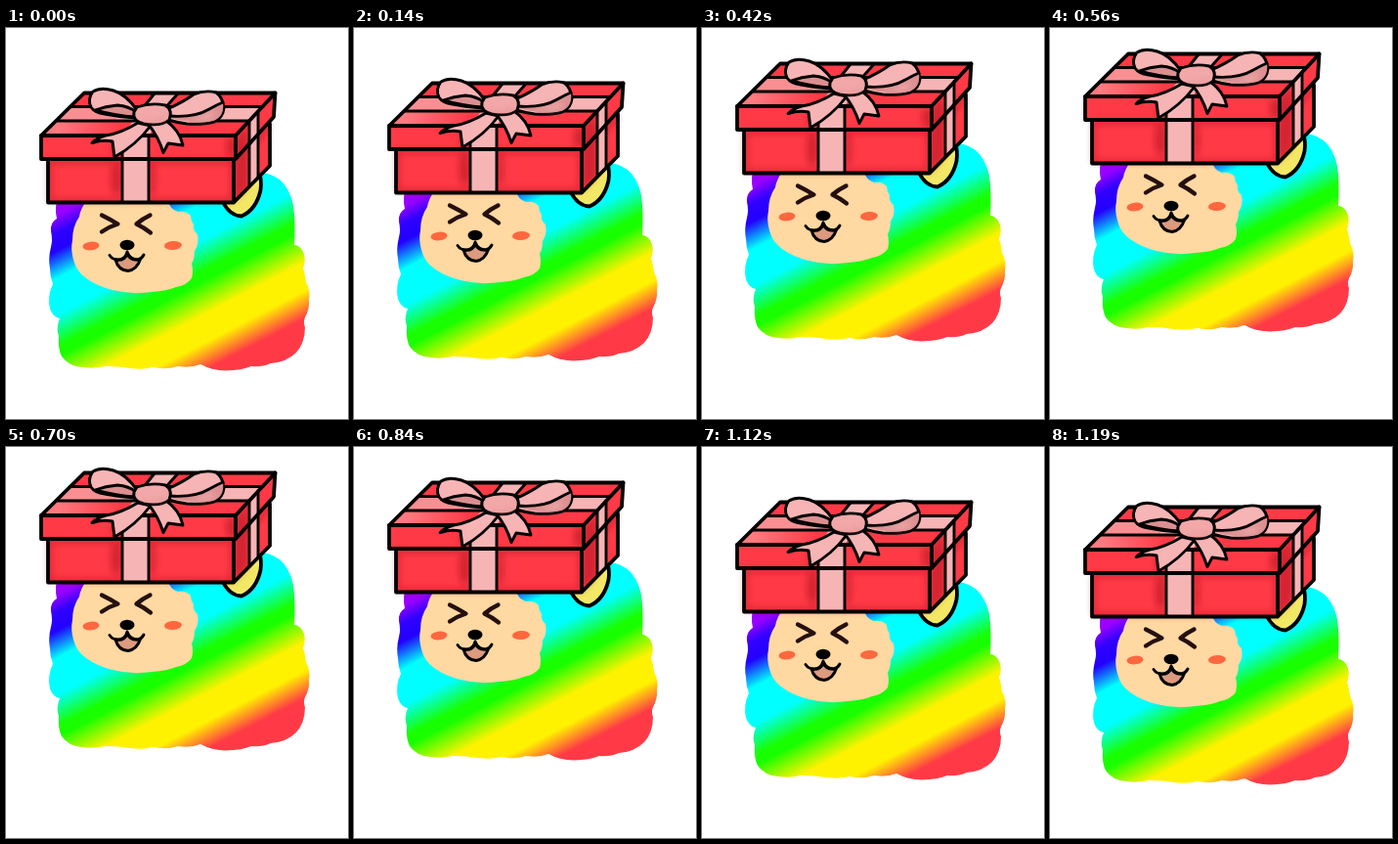
An HTML page that plays this animation: 350 px wide and 400 px high, repeating every 1260 ms.

```html
<!DOCTYPE html>
<html lang="en">
<head>
<meta charset="utf-8">
<title>Rainbow sheep with a gift</title>
<style>
  html, body { margin: 0; width: 100%; height: 100%; overflow: hidden; background: #fff; }
  svg { display: block; width: 100%; height: 100%; }
  .ink { stroke: #000; stroke-width: 3.8; stroke-linejoin: round; stroke-linecap: round; }
  .thin { stroke-width: 2.9; }
  .eye { stroke: #25100f; stroke-width: 4.3; }
  .red { fill: #ff3a46; }
  .pink { fill: #f7b4b5; }
  .none { fill: none; }
</style>
</head>
<body>
<svg viewBox="0 0 350 400">
  <defs>
    <!-- Bands run along y + 0.52x; the vector spans 200 to 460 on that scale -->
    <linearGradient id="rainbow" gradientUnits="userSpaceOnUse" x1="81.86" y1="157.43" x2="188.28" y2="362.09">
      <stop offset=".07" stop-color="#9a00ff"/>
      <stop offset=".14" stop-color="#3000ff"/>
      <stop offset=".21" stop-color="#2200ff"/>
      <stop offset=".32" stop-color="#00ffff"/>
      <stop offset=".465" stop-color="#00ffff"/>
      <stop offset=".59" stop-color="#18ff00"/>
      <stop offset=".63" stop-color="#18ff00"/>
      <stop offset=".765" stop-color="#fff200"/>
      <stop offset=".875" stop-color="#fff200"/>
      <stop offset=".985" stop-color="#ff3a46"/>
    </linearGradient>
    <linearGradient id="shine">
      <stop offset=".2" stop-color="#ff7a80"/>
      <stop offset="1" stop-color="#ff3a46"/>
    </linearGradient>
    <filter id="soft" x="-60%" y="-60%" width="220%" height="220%">
      <feGaussianBlur stdDeviation="3"/>
    </filter>
    <clipPath id="lidFront"><path d="M36 110H235V134H36Z"/></clipPath>
    <clipPath id="boxFront"><path d="M43 135H233V178H43Z"/></clipPath>
    <clipPath id="side"><path d="M235 110L275 66V91L270 97V141L233 178Z"/></clipPath>
  </defs>

  <g id="sheep">
    <path fill="url(#rainbow)" d="M54 170Q49 184 52 195Q45 199 46 208Q48 217 46 224
      Q43 236 45 246Q45 254 48 262Q42 274 45 287Q48 296 55 297Q51 307 54 315
      Q53 328 57 336Q64 346 78 347Q90 349 101 346Q116 346 126 348Q140 350 151 347
      Q164 350 176 346Q189 348 199 344Q210 350 225 350.500Q242 350 251 346
      Q262 347 271 343Q287 342 297 332Q306 322 306 306Q304 301 306 296
      Q311 287 310 278Q312 269 307 260Q306 251 304 246Q308 235 303 227
      Q299 222 295 222Q296 208 295 190Q294 171 284 159Q275 149 261 148L230 160Z"/>

    <path class="ink" fill="#f3e866" d="M222 178Q229 192 241 192.500Q256 186 260.500 166Q262 156 259 148L234 168Z"/>

    <path fill="#ffd8a2" d="M84 174Q76 185 75 193Q68 203 68 217Q66 226 69 237Q72 249 82 256
      Q93 264 109 268Q128 273 149 270Q165 269 174 265Q185 263 190 256Q192 249 190 241
      Q193 236 193 228Q198 221 196 211Q191 207 192 201Q189 197 189 192
      Q184 187 176 188Q168 186 164 174Z"/>

    <g fill="#ff673f">
      <ellipse cx="87" cy="223" rx="8.500" ry="4.300" transform="rotate(-6 87 223)"/>
      <ellipse cx="171" cy="222.500" rx="9" ry="4.400" transform="rotate(-4 171 222.500)"/>
    </g>
    <path class="ink eye none" d="M98 191.500Q107 196 114.500 200.500Q106 203 98 208.500"/>
    <path class="ink eye none" d="M147.500 191.500Q140 195 133.500 200.500Q141 204 148 209.500"/>
    <path class="ink thin" fill="#dc9a7e" d="M112 237Q115 248 125 248.500Q134 247 137.500 236.500Q128 239 124 231Q121 239 112 237Z"/>
    <path class="ink thin none" d="M106 232.500Q109 237 114 237Q122 237 124 229Q127 237 135 237Q139 236 141 232"/>
    <ellipse cx="124" cy="222" rx="7.500" ry="5.300"/>

    <!-- box -->
    <path class="red" d="M43 134H233V178H43Z"/>
    <path class="red" d="M233 134L270 97V141L233 178Z"/>
    <path class="red" d="M36 110L80 66.500H275V91L235 134H36Z"/>
    <path fill="url(#shine)" d="M36 110L51 95H118L112 110Z"/>
    <g fill="#a80f1a" opacity=".5" filter="url(#soft)">
      <g clip-path="url(#boxFront)">
        <path class="none" stroke="#a80f1a" stroke-width="7" d="M43 135H233V178H43Z"/>
        <ellipse cx="113" cy="154" rx="6" ry="17"/>
        <ellipse cx="150" cy="154" rx="3" ry="17"/>
      </g>
      <g clip-path="url(#lidFront)">
        <ellipse cx="113" cy="124" rx="5" ry="8"/>
        <ellipse cx="230" cy="122" rx="5" ry="11"/>
      </g>
      <path clip-path="url(#side)" d="M235 112L248 98V120L270 97V104L248 128V162L234 178Z"/>
    </g>

    <!-- ribbon -->
    <path class="pink" d="M110 95L124 80.500H262L249 95Z"/>
    <path fill="#f98f92" d="M52 95L66 80.500H124L110 95Z"/>
    <path class="pink" d="M119 110L152 66.500H176L146 110V178H119Z"/>
    <path class="pink" d="M249 95L258 85V152L249 162Z"/>
    <g class="ink none thin">
      <path d="M52 95H249M66 80.500H263"/>
      <path d="M119 110V178M146 110V178M152 67L140 82M176 67L160 85"/>
      <path d="M249 96V162M258 85V152"/>
    </g>
    <g class="ink none">
      <path d="M36 110L80 66.500H275.500L235 110Z"/>
      <path d="M36 110V134H235V110M235 134L274 91L275.500 66.500"/>
      <path d="M43 135V178.500H233V135M233 178.500L270 141V98"/>
    </g>

    <!-- bow -->
    <g class="ink thin pink">
      <path d="M135 97Q117 108 102 110Q94 112 88 117.500Q99 114 109 116L111 132Q133 120 148 100Z"/>
      <path d="M146 99Q156 111 161 127.500L166 118L181 120Q178 105 164 95Z"/>
      <path d="M134 84Q123 68 110 64Q97 60 89 65Q83 73 87 81Q91 87 101 88Q116 91 132 92Z"/>
      <path d="M165 83Q181 76 192 68Q204 63 215 66Q222 71 223 82Q222 92 213 96Q202 99 185 98Q176 97 166 94Z"/>
      <path fill="#dc8f90" d="M132 91Q113 90 91 84Q102 80 114 79Q126 80 133 86Z"/>
    </g>
    <path fill="#dc8f90" d="M168 91Q193 92 208 83Q218 78 222 76Q224 91 212 95Q195 99 168 92Z"/>
    <path class="pink" filter="url(#soft)" d="M182 93Q203 92 214 85Q213 93 202 94Z"/>
    <path class="ink thin none" d="M167 90Q193 92 208 83Q217 78 222 76"/>
    <path class="ink thin" fill="#f2a7a8" d="M134 81Q148 76 163 79Q171 84 167 94Q159 101 141 98Q129 95 131 86Z"/>
    <path filter="url(#soft)" fill="#cf7c7e" opacity=".6" d="M136 92Q149 100 164 91L160 97H142Z"/>
  </g>
</svg>
<script>
  const STEP = 70, STEPS = 18, RISE = 5;
  const sheep = document.getElementById("sheep");

  // Climb for half the loop, then sink back, one hard step at a time.
  function draw(ms) {
    const step = Math.floor(ms / STEP) % STEPS;
    const lift = RISE * Math.min(step, STEPS - step);
    sheep.setAttribute("transform", `translate(0 ${-lift})`);
  }

  const start = performance.now();
  function tick() {
    draw(performance.now() - start);
    requestAnimationFrame(tick);
  }
  tick();
</script>
</body>
</html>
```
